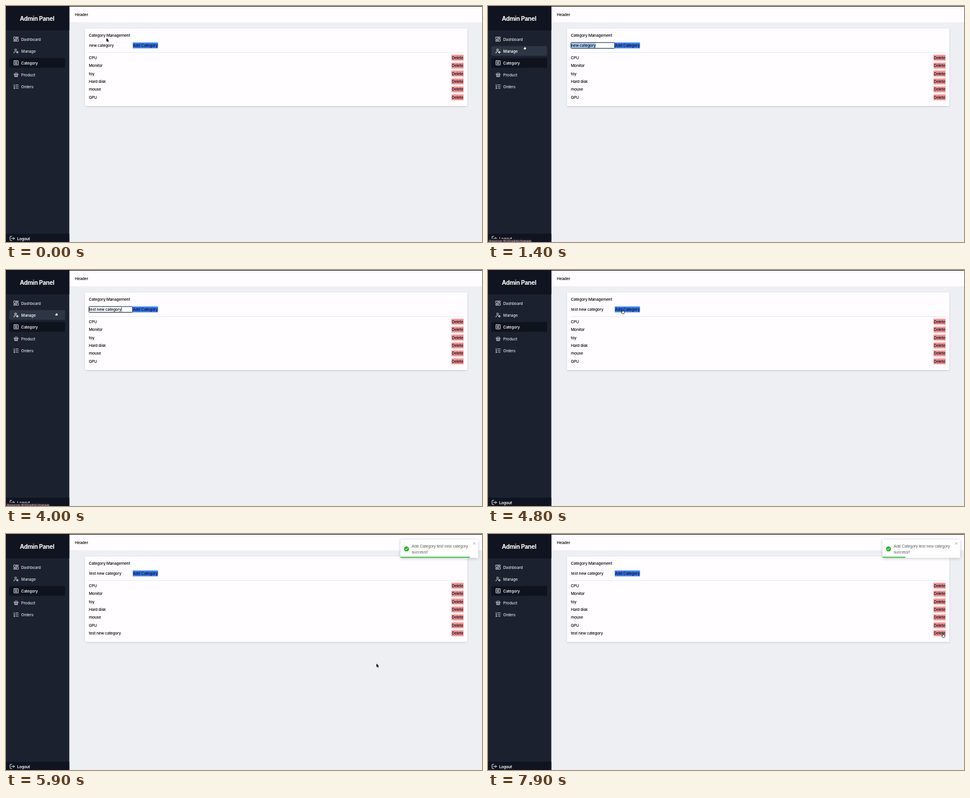
These frames come from a looping animation (800x399 px, 8 s). An HTML page with a canvas:

```html
<!DOCTYPE html>
<html lang="en">
<head>
<meta charset="utf-8">
<title>Admin Panel</title>
<style>
html, body { margin: 0; width: 100%; height: 100%; overflow: hidden; background: #eeeff3; }
canvas { display: block; width: 800px; height: 399px; }
</style>
</head>
<body>
<canvas id="stage"></canvas>
<script>
const W = 800, H = 399, LOOP = 8000;
const canvas = document.getElementById('stage');
const dpr = window.devicePixelRatio || 1;
canvas.width = W * dpr;
canvas.height = H * dpr;
const c = canvas.getContext('2d');

const UI = 'Inter, Roboto, sans-serif';
const PLAIN = '"Liberation Sans", Arial, sans-serif';
const SIZE = 6.67, WEIGHT = 500, SPACING = -0.029;
const ROWS = ['CPU', 'Monitor', 'toy', 'Hard disk', 'mouse', 'GPU'];
const OLD = 'new category', NEW = 'test new category';
const ROW_H = 13.4, SIDE = 106.4;
const TOAST = [662.8, 9.2, 130.8, 31.4];

// moments in ms
const PRESS = 450, DRAG_END = 700, TYPE = 1750, KEY = 95;
const WAKE = 3700, CLICK = 4700, ADDED = 5380, BAR = 5540;

// pointer tip: time, x, y
const PATH = [
  [0, 168.8, 54], [150, 168.8, 54], [430, 183, 66], [700, 136, 67], [950, 92, 69],
  [1300, 61, 67], [3700, 61, 67], [4000, 84, 70.6], [4200, 96, 71],
  [4600, 226, 67], [5350, 226, 67], [5850, 622.6, 219], [6250, 622.6, 219],
  [7100, 758, 181], [7500, 764.5, 168], [8000, 764.5, 168]
];

const clamp = v => Math.max(0, Math.min(1, v));
const mix = (a, b, k) => a + (b - a) * k;

function along(keys, t) {
  let i = 0;
  while (i < keys.length - 2 && t >= keys[i + 1][0]) i++;
  const a = keys[i], b = keys[i + 1];
  let k = clamp((t - a[0]) / (b[0] - a[0]));
  k = k * k * (3 - 2 * k);
  return a.slice(1).map((v, n) => mix(v, b[n + 1], k));
}

function box(x, y, w, h, fill, r = 0) {
  c.fillStyle = fill;
  c.beginPath();
  c.roundRect(x, y, w, h, r);
  c.fill();
}

function setFont(size, weight, family, spacing) {
  c.font = `${weight} ${size}px ${family}`;
  c.letterSpacing = spacing * size + 'px';
}

// y is the middle of the capital letters
function text(s, x, y, color = '#050505', o = {}) {
  const size = o.size || SIZE;
  setFont(size, o.weight || WEIGHT, o.family || UI, o.spacing ?? SPACING);
  c.textAlign = o.align || 'left';
  c.fillStyle = color;
  c.fillText(s, x, y + size * 0.363);
}

function textWidth(s) {
  setFont(SIZE, WEIGHT, UI, SPACING);
  return c.measureText(s).width;
}

function shadowed(color, blur, dy, draw) {
  c.save();
  c.shadowColor = color;
  c.shadowBlur = blur * dpr;
  c.shadowOffsetY = dy * dpr;
  draw();
  c.restore();
}

function strokePath(d, x, y, color, width = 0.85) {
  c.save();
  c.translate(x, y);
  c.strokeStyle = color;
  c.lineWidth = width;
  c.lineCap = c.lineJoin = 'round';
  c.stroke(new Path2D(d));
  c.restore();
}

// icons on an 8 px square
const ICONS = {
  Dashboard: 'M.4 .4h2.8v4H.4zM4.8 .4h2.8v2H4.8zM.4 6h2.8v1.6H.4zM4.8 4h2.8v3.6H4.8z',
  Manage: 'M1.6 2.2a1.6 1.6 0 1 0 3.2 0a1.6 1.6 0 1 0 -3.2 0M.4 7.6V6.9Q.4 5.1 2.3 5.1H3.4' +
    'M5 6.1a1.1 1.1 0 1 0 2.2 0a1.1 1.1 0 1 0 -2.2 0M6.1 4.3v.7M6.1 7.2v.7M4.4 6.1h.6M7.2 6.1h.7',
  Category: 'M1 .4h6q.6 0 .6 .6v6q0 .6-.6 .6h-6q-.6 0-.6-.6v-6q0-.6 .6-.6zM2.5 2.5h3M2.5 4h2.2M2.5 5.5h3',
  Product: 'M.3 3.2h7.4M.9 3.2l.8 4.2h4.6l.8-4.2M1.9 3.2L3 .6M6.1 3.2L5 .6M2.9 4.6v1.5M4 4.6v1.5M5.1 4.6v1.5',
  Orders: 'M3.4 1.2h4.3M3.4 4h4.3M3.4 6.8h4.3M.5 .6h.5v1.6M.4 3.4h.9L.4 4.7h.9M.4 6h.9v1.6H.4M.7 6.8h.6',
  Logout: 'M3 .4H1Q.4 .4 .4 1v6q0 .6 .6 .6h2M2.8 4h4.9M5.8 2l1.9 2l-1.9 2'
};

function sidebar(hover) {
  box(0, 0, SIDE, H, '#1b212e');
  box(0, 0, SIDE, 41, '#0f1420');
  text('Admin Panel', 52.2, 21.2, '#fff', { size: 10, weight: 700, align: 'center', spacing: -0.03 });
  ['Dashboard', 'Manage', 'Category', 'Product', 'Orders'].forEach((name, i) => {
    const y = 56 + i * 20.05, active = name === 'Category';
    const lit = active || (name === 'Manage' && hover);
    if (lit) box(5.5, y - 8.3, 93.8, 16.6, active ? '#0e131e' : '#2d3645', 2);
    const color = lit ? '#fff' : '#d8dce3';
    strokePath(ICONS[name], 13, y - 4, color);
    text(name, 25.5, y + 0.1, color);
  });
  box(0, 385, SIDE, 14, '#0f1420');
  strokePath(ICONS.Logout, 6.5, 389, '#fff', 0.9);
  text('Logout', 18.8, 393.1, '#fff', { weight: 600 });
  if (hover) {
    box(0, 393.6, 73, 5.4, '#1c1a22', [0, 1, 0, 0]);
    text('devserver:4000/admin/manage', 1, 396.8, '#d9b3c2', { size: 5 });
  }
}

function field(t) {
  const focused = t >= PRESS && t < CLICK;
  const count = Math.max(0, Math.min(NEW.length, Math.floor((t - TYPE) / KEY)));
  const value = count ? NEW.slice(0, count) : OLD;
  const x = 139.8;
  if (focused && !count) {
    const w = textWidth(OLD), k = clamp((t - PRESS) / (DRAG_END - PRESS));
    box(x + w * (1 - k), 62.2, w * k, 8.8, '#a8cdf8');
  }
  c.strokeStyle = focused ? '#14284a' : '#f3f2f5';
  c.lineWidth = focused ? 1 : 0.5;
  c.beginPath();
  c.roundRect(139.4, 61.8, 73.3, 9.7, focused ? 0.8 : 0);
  c.stroke();
  text(value, x, 66.8);
  if (focused && count) box(x + textWidth(value) + 0.1, 63, 0.6, 7.4, '#111');
}

function remove(y) {
  box(748.8, y - 4.9, 20.2, 9.8, '#f09294');
  text('Delete', 758.9, y, '#14090a', { align: 'center' });
}

function page(t) {
  box(0, 0, W, H, '#eeeff3');
  box(SIDE, 0, W - SIDE, 27.5, '#fffdff');
  text('Header', 115.7, 14.6);
  const rows = t >= ADDED ? ROWS.concat(NEW) : ROWS;
  const bottom = 169 + (rows.length - ROWS.length) * ROW_H;
  shadowed('rgba(0,0,0,.16)', 3, 1, () => box(132.7, 38, 642.7, bottom - 38, '#fffdff', 1));
  text('Category Management', 139.2, 49.3);
  box(213, 61.7, 42.4, 9.9, '#3377f0');
  text('Add Category', 234.2, 66.8, '#060a16', { align: 'center' });
  field(t);
  box(139, 78.6, 630, 0.6, '#dddfe4');
  rows.forEach((name, i) => {
    const y = 87.4 + i * ROW_H;
    text(name, 139.2, y);
    remove(y);
  });
}

function toast(t) {
  if (t < ADDED) return;
  const k = clamp((t - ADDED) / 450);
  const [dx] = along([[0, 500], [0.6, -10], [0.75, 4], [0.9, -2], [1, 0]], k);
  const [x, y, w, h] = TOAST;
  c.save();
  c.translate(dx, 0);
  c.globalAlpha = clamp(k / 0.6);
  shadowed('rgba(0,0,0,.22)', 5, 0.8, () => box(x, y, w, h, '#fffeff', 1.7));
  c.fillStyle = '#24b52c';
  c.beginPath();
  c.arc(673.2, 25.3, 4.2, 0, 7);
  c.fill();
  strokePath('M0 1.7l1.5 1.5L4.4 0', 671, 23.7, '#fff', 1);
  const plain = { family: PLAIN, spacing: 0, weight: 400 };
  text('Add Category test new category', 681.7, 20.1, '#5c5c5c', plain);
  text('success!!', 681.7, 30.1, '#5c5c5c', plain);
  strokePath('M0 0l3.4 3.4M3.4 0L0 3.4', 785.4, 14.2, '#9a9a9a', 0.7);
  const left = 1 - clamp((t - BAR) / 3350);
  c.beginPath();
  c.roundRect(x, y, w, h, 1.7);
  c.clip();
  box(x, y + h - 2.1, w * left, 2.1, '#30bd38');
  c.restore();
}

const ARROW = new Path2D('M0 0V6.2L1.5 4.9L2.5 7.2L3.5 6.8L2.5 4.5H4.4Z');
const HAND = new Path2D('M-.6 .5Q0-.4 .6 .5V2.5Q1.1 2.1 1.6 2.7Q2.2 2.4 2.5 3Q3.1 2.8 3.2 3.5' +
  'V5.2Q3 6.3 2.5 7H-.4Q-1.2 5.8-2.1 4.6Q-2.2 3.8-1.4 4L-.6 4.5Z');
const BEAM = 'M-1 -3Q0-3 0-2V2Q0 3-1 3M1-3Q0-3 0-2M0 2Q0 3 1 3';

function pointer(t, x, y, hover) {
  if (t >= TYPE && t < WAKE) return;
  const inside = (l, r, top, low) => x > l && x < r && y > top && y < low;
  if (inside(139, 212, 62, 72)) {
    strokePath(BEAM, x, y, '#222', 0.7);
    return;
  }
  const link = hover || inside(213, 255, 61, 72) || inside(749, 769, 163, 173);
  c.save();
  c.translate(x, y);
  c.lineJoin = 'round';
  if (link) {
    c.fillStyle = '#fff';
    c.strokeStyle = '#111';
    c.lineWidth = 0.8;
    c.fill(HAND);
    c.stroke(HAND);
  } else {
    c.strokeStyle = '#fff';
    c.fillStyle = '#000';
    c.lineWidth = 1;
    c.stroke(ARROW);
    c.fill(ARROW);
  }
  c.restore();
}

function draw(t) {
  c.setTransform(dpr, 0, 0, dpr, 0, 0);
  const [x, y] = along(PATH, t);
  const hover = x > 5 && x < 99 && y > 66 && y < 84;
  page(t);
  sidebar(hover);
  box(0, 0, W, 1, '#1c1320');
  toast(t);
  pointer(t, x, y, hover);
}

const start = performance.now();
function tick(now) {
  draw(Math.max(0, now - start) % LOOP);
  requestAnimationFrame(tick);
}
draw(0);
requestAnimationFrame(tick);
</script>
</body>
</html>
```
